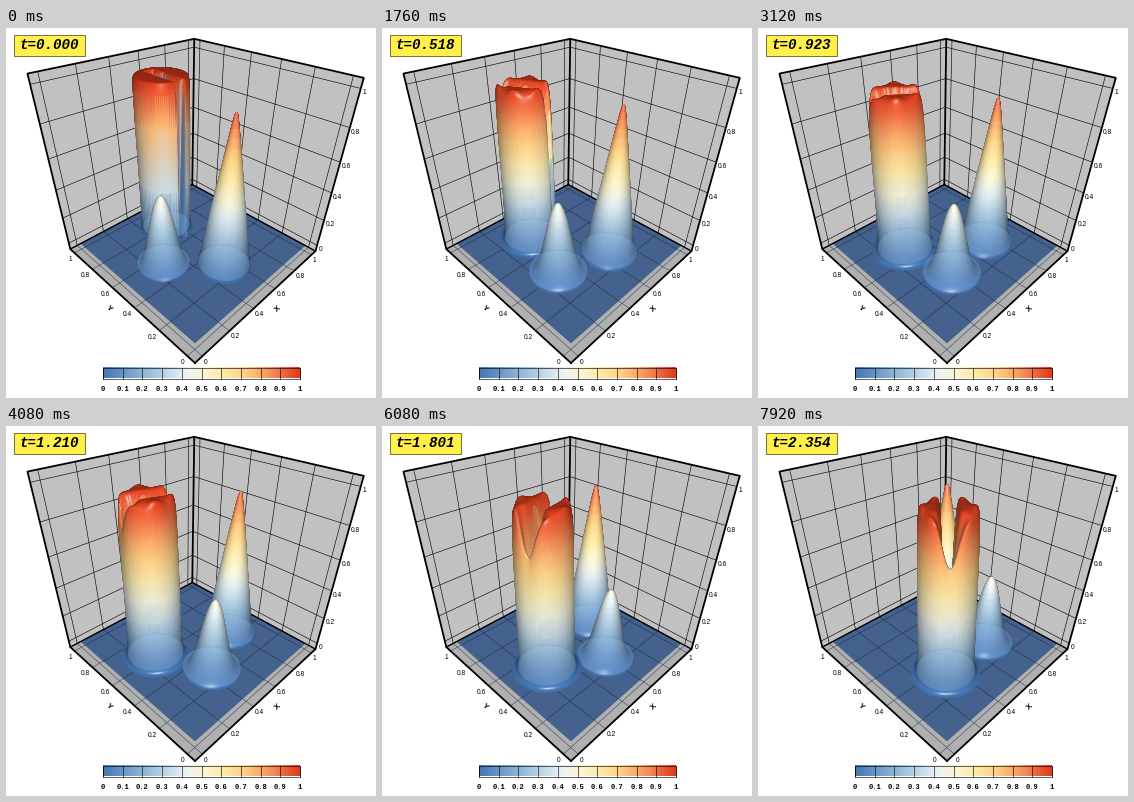
Recreate the animation shown at these times as a matplotlib script. Size 370x370 px, loop 8 s.

```python
import numpy as np
import matplotlib.pyplot as plt
from matplotlib.animation import FuncAnimation
from matplotlib.collections import TriMesh
from matplotlib.colors import LinearSegmentedColormap
from matplotlib.patches import Polygon, Rectangle
from matplotlib.tri import Triangulation

SIZE, FRAMES, INTERVAL = 370, 100, 80
PX = 0.72  # points per pixel at 100 dpi
PAD = 0.05  # gap between the unit cube and the axes box
TICKS = np.linspace(0, 1, 6)

CMAP = LinearSegmentedColormap.from_list("heat", [
    (0, "#4575b4"), (0.25, "#a0c4e0"), (0.42, "#eaf3f4"), (0.52, "#fcf6d0"),
    (0.62, "#fee9a6"), (0.72, "#fed086"), (0.84, "#f79a60"), (0.92, "#ec6840"),
    (1, "#de3b1c")])

# Perspective camera: near corner plus weighted vanishing points of x, y, z
ORIGIN = np.array([189, 335, 1.0])
AXES = np.column_stack([0.3656 * np.array([639, -83, 1]),
                        0.357 * np.array([-285, -98, 1]),
                        -0.369 * np.array([179, 691, 1])])
CAMERA = np.linalg.solve(AXES, -ORIGIN) * (1 + 2 * PAD) - PAD


def project(points):
    """World points (..., 3) to stage pixels (..., 2)."""
    box = (np.asarray(points, float) + PAD) / (1 + 2 * PAD)
    h = box @ AXES.T + ORIGIN
    return h[..., :2] / h[..., 2:]


def step(u):
    return 0.5 * (1 + np.tanh(1.2 * u))


def settle(t):
    return min(1, t / 0.35)


def cylinder(x, y, t):
    r, angle = np.hypot(x, y), np.arctan2(y, x)
    soft = settle(t)
    s = 0.004 + 0.008 * soft
    wall = (0.89 * step((0.15 - 0.006 * soft - r) / s)
            + 0.11 * step((0.15 + 0.004 * soft - r) / (2.2 * s)))
    slot = step((x + 0.025) / s) * step((0.025 - x) / s) * step((0.1 - y) / s)
    dip = (np.clip(0.11 * t - 0.02, 0, 0.205)
           * np.exp(-((x + 0.01) / 0.05) ** 2) * step((y - 0.07) / 0.02))
    lobe = 0.05 * max(0, 1 - t / 1.6) * np.exp(-((angle - 1.8) / 0.35) ** 2)
    rim = np.exp(-((r - 0.13) / 0.025) ** 2) * (0.015 * np.cos(6 * angle) + lobe)
    return wall * (1 - slot) * (1 - dip + soft * (rim - 0.012))


def cone(x, y, t):
    tip = 0.0085 + 0.0015 * t
    k = 0.012 + 0.03 * settle(t)
    q = 1 - np.sqrt(x * x + y * y + tip * tip) / 0.15
    return k * np.logaddexp(0, q / k)


def hump(x, y, t):
    r = np.minimum(np.hypot(x, y) / (0.15 + 0.04 * settle(t)), 1)
    return 0.485 * (0.5 + 0.5 * np.cos(np.pi * r)) ** (1 + 0.8 * settle(t))


def polar_mesh(rings, n):
    angle = np.linspace(0, 2 * np.pi, n, endpoint=False)
    r, a = np.meshgrid(rings, angle, indexing="ij")
    i, j = np.meshgrid(np.arange(len(rings) - 1), np.arange(n), indexing="ij")
    p, q = (i * n + j).ravel(), (i * n + (j + 1) % n).ravel()
    tris = np.vstack([np.column_stack([p, q, p + n]),
                      np.column_stack([q, q + n, p + n])])
    return (r * np.cos(a)).ravel(), (r * np.sin(a)).ravel(), tris


def rotate(x, y, t):
    c, s = np.cos(t), np.sin(t)
    return c * x - s * y, s * x + c * y


def shade(points, normals, heights):
    view = CAMERA - points
    view /= np.linalg.norm(view, axis=-1, keepdims=True)
    facing = np.abs((view * normals).sum(-1))
    rgba = CMAP(np.clip(heights, 0, 1))
    rgb = rgba[:, :3] * np.clip(0.5 + 0.56 * facing, 0, 1.04)[:, None]
    shine = 0.85 * np.clip(2 * facing ** 2 - 1, 0, 1) ** 20
    rgba[:, :3] = np.clip(rgb + shine[:, None] * (1 - rgb), 0, 1)
    rgba[:, 3] = np.clip(heights / 0.008, 0, 1)
    return rgba


SMALL = polar_mesh(0.21 * np.linspace(0, 1, 25) ** 1.2, 52)
LARGE = polar_mesh(np.r_[np.linspace(0, 0.1, 10), np.linspace(0.105, 0.2, 32)], 88)
BODIES = [(cylinder, 0, 0.25, LARGE), (cone, 0, -0.25, SMALL), (hump, -0.25, 0, SMALL)]

fig = plt.figure(figsize=(3.7, 3.7), dpi=100, facecolor="white")
ax = fig.add_axes([0, 0, 1, 1])
ax.axis("off")


def line(points, width, color="black", z=1, alpha=1):
    ax.plot(*project(points).T, color=color, lw=width * PX, zorder=z, alpha=alpha,
            solid_capstyle="round", solid_joinstyle="round")


def face(points, color, z=0):
    ax.add_patch(Polygon(project(points), fc=color, ec="none", zorder=z))


def label(x, y, text, size, **style):
    style = {"family": "Liberation Sans", "ha": "center", "va": "center", **style}
    return ax.text(x, y, text, fontsize=size * PX, zorder=20, **style)


def draw_box():
    lo, hi = -PAD, 1 + PAD
    near, left, right, back = [(a, b, lo) for a, b in
                               [(lo, lo), (lo, hi), (hi, lo), (hi, hi)]]
    left_top, right_top, back_top = [(a, b, hi) for a, b, _ in (left, right, back)]
    face([left, back, back_top, left_top], "#c1c1c1")
    face([right, back, back_top, right_top], "#c1c1c1")
    face([near, left, back, right], "#b0b0b0")
    face([(0, 0, 0), (1, 0, 0), (1, 1, 0), (0, 1, 0)], "#44628d", z=1)
    for v in TICKS:
        for a, b in [((v, hi, lo), (v, hi, hi)), ((lo, hi, v), (hi, hi, v)),
                     ((hi, v, lo), (hi, v, hi)), ((hi, lo, v), (hi, hi, v))]:
            line([a, b], 0.6)
        line([(v, lo, lo), (v, hi, lo)], 0.6, "#16263c", 2, 0.7)
        line([(lo, v, lo), (hi, v, lo)], 0.6, "#16263c", 2, 0.7)
        for tick, dx, dy, ha in [((v, lo, lo), 1.5, 6, "left"),
                                 ((lo, v, lo), -2.8, 6.5, "right"),
                                 ((hi, lo, v), 1.3, 4.5, "left")]:
            x, y = project(tick)
            label(x + dx, y + dy, f"{v:.1g}", 6.6, ha=ha)
    line([left, back, right], 1.4, z=1)
    line([back, back_top], 1.8)
    line([near, left, left_top, back_top, right_top, right, near], 1.8, z=2)
    label(103, 281, "Y", 8, weight="bold", rotation=-42)
    label(272, 281, "X", 8, weight="bold", rotation=42)


def draw_colorbar():
    x0, x1, y0, y1 = 97, 294, 339.5, 350.5
    ax.imshow(np.linspace(0, 1, 256)[None], cmap=CMAP, extent=(x0, x1, y1, y0),
              aspect="auto", zorder=3)
    ax.add_patch(Rectangle((x0, y0), x1 - x0, y1 - y0, fc="none", ec="black",
                           lw=0.6 * PX, zorder=4))
    for k in range(11):
        x = x0 + (x1 - x0) * k / 10
        ax.plot([x, x], [y0, y1], color="black", lw=0.6 * PX, zorder=4)
        label(x, 361.5, f"{k / 10:.1g}", 7.2, family="Liberation Mono", weight="bold")


draw_box()
draw_colorbar()
ax.set(xlim=(0, SIZE), ylim=(SIZE, 0))
ax.add_patch(Rectangle((7.5, 6.5), 71, 21, fc="#fff04a", ec="#5a5220",
                       lw=0.8 * PX, zorder=19))
clock = label(43, 17.3, "", 14.2, family="Liberation Mono", weight="bold",
              style="italic")
drawn = []


def draw_body(t, height, cx, cy, mesh, z):
    x, y, tris = mesh
    h = height(x, y, t)
    e = 0.002
    gx = (height(x + e, y, t) - height(x - e, y, t)) / (2 * e)
    gy = (height(x, y + e, t) - height(x, y - e, t)) / (2 * e)
    wx, wy = rotate(x + cx, y + cy, t)
    points = np.column_stack([wx + 0.5, wy + 0.5, h])
    gx, gy = rotate(gx, gy, t)
    normals = np.column_stack([-gx, -gy, np.ones_like(gx)])
    normals /= np.linalg.norm(normals, axis=1, keepdims=True)

    tris = tris[h[tris].max(axis=1) > 0.001]
    depth = (wx + wy)[tris].mean(axis=1)
    tris = tris[np.argsort(-depth)]
    surface = TriMesh(Triangulation(*project(points).T, tris), zorder=z)
    surface.set_facecolor(shade(points, normals, h))
    drawn.append(ax.add_collection(surface, autolim=False))

    # Base disc glimmering through the translucent wall
    a = np.linspace(0, 2 * np.pi, 60)
    bx, by = rotate(cx, cy, t)
    radius = 0.15 + 0.015 * settle(t)
    disc = np.column_stack([bx + 0.5 + radius * np.cos(a),
                            by + 0.5 + radius * np.sin(a), np.full(60, 0.02)])
    drawn.append(ax.add_patch(Polygon(project(disc), fc=(0.6, 0.76, 0.93, 0.27),
                                      ec=(0.35, 0.5, 0.68, 0.25), lw=0.7 * PX,
                                      zorder=z + 0.5)))


def update(frame):
    while drawn:
        drawn.pop().remove()
    t = np.interp(frame, [0, 22, 39, 51, 67, 84, 99],
                  [0, 0.518, 0.923, 1.210, 1.588, 1.990, 2.354])
    clock.set_text(f"t={t:.3f}")
    far_first = sorted(BODIES, key=lambda b: -sum(rotate(b[1], b[2], t)))
    for k, body in enumerate(far_first):
        draw_body(t, *body, z=5 + k)
    return drawn


anim = FuncAnimation(fig, update, frames=FRAMES, interval=INTERVAL,
                     init_func=lambda: [], repeat=True, repeat_delay=0)
plt.show()
```
